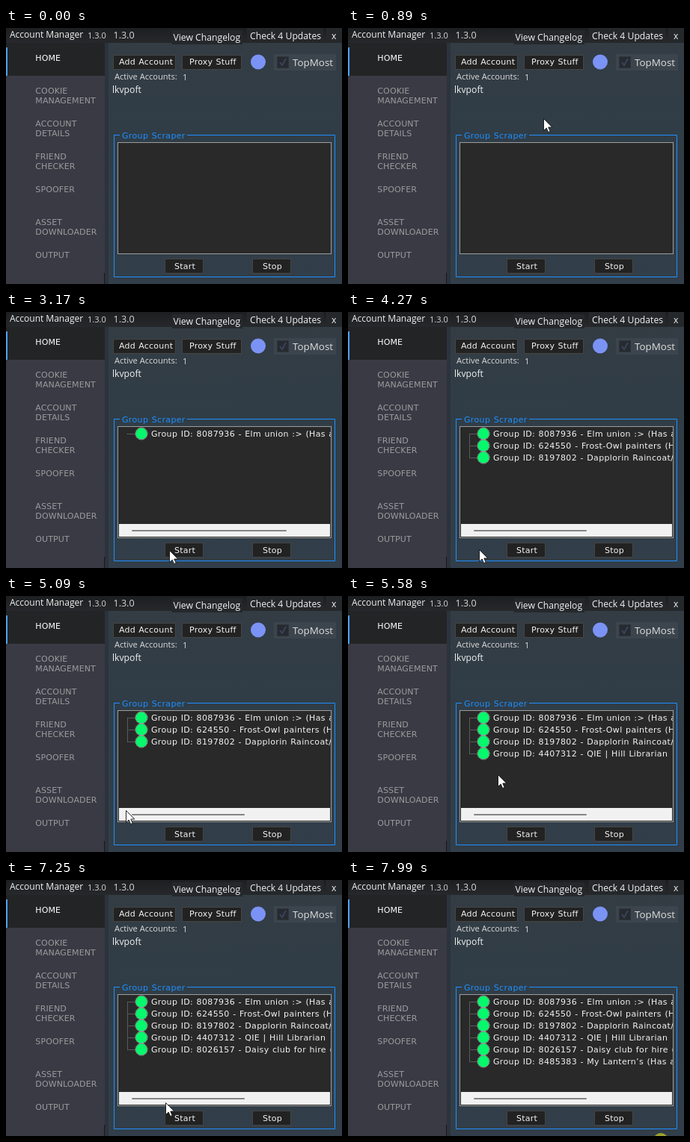
An HTML page for the animation above (8060 ms loop, 449 by 343 pixels).

```html
<!DOCTYPE html>
<html lang="en">
<head>
<meta charset="utf-8">
<title>Account Manager</title>
<style>
  html, body { margin: 0; width: 100%; height: 100%; overflow: hidden; background: #303c46; }
  svg { display: block; width: 449px; height: 343px; }
  text { white-space: pre; }
  .ui { font: 12.2px "Open Sans", "Noto Sans", sans-serif; fill: #f2f2f2; }
  .wide { font: 11px "DejaVu Sans", sans-serif; letter-spacing: .35px; word-spacing: .6px; fill: #f4f4f4; }
  .label { letter-spacing: .22px; }
  .menu { font: 11px "DejaVu Sans", sans-serif; letter-spacing: .12px; fill: #9b9b9e; }
  .btn { fill: #222; stroke: #454545; }
  .dots { stroke: #8c8c8c; stroke-dasharray: 1 1; fill: none; }
  .ring { stroke: #fff; stroke-dasharray: 1 1; fill: none; }
</style>
</head>
<body>
<svg id="stage" viewBox="0 0 449 343">
  <defs>
    <linearGradient id="panel" x2="0" y2="1">
      <stop offset="0" stop-color="#343c43"/>
      <stop offset=".4" stop-color="#303d47"/>
      <stop offset="1" stop-color="#323e49"/>
    </linearGradient>
    <linearGradient id="bar" x2="0" y2="1">
      <stop offset="0" stop-color="#1d1e20"/>
      <stop offset="1" stop-color="#26282b"/>
    </linearGradient>
    <clipPath id="listClip"><rect x="150" y="154" width="284" height="148"/></clipPath>
  </defs>

  <rect width="449" height="343" fill="url(#panel)"/>
  <rect x="132" y="20" width="5" height="323" fill="#2b333d"/>
  <rect y="20" width="132" height="323" fill="#393a43"/>
  <rect x="131" y="328" width="1" height="15" fill="#17181b"/>
  <rect width="449" height="20" fill="url(#bar)"/>
  <rect y="20" width="132" height="44" fill="#232425"/>
  <rect y="26" width="2" height="38" fill="#4f9ff0"/>
  <g id="menu"></g>

  <g class="ui">
    <text x="5" y="13" style="font-size:12px">Account Manager</text>
    <text x="109" y="14" style="font-size:11px" fill="#d8d8d8">1.3.0</text>
    <text x="143.5" y="14" style="font-size:12.5px" fill="#d8d8d8">1.3.0</text>
    <rect x="222" y="3" width="94" height="19" fill="#25282b"/>
    <rect x="322" y="0" width="102" height="20" fill="#25282b"/>
    <rect x="428" y="0" width="21" height="20" fill="#25282b"/>
    <text x="223.5" y="16.5">View Changelog</text>
    <text x="326" y="15">Check 4 Updates</text>
    <text x="435" y="15">x</text>
    <text x="145" y="69" style="font-size:11.1px" fill="#dcdcdc">Active Accounts:</text>
    <text x="236" y="70" style="font-size:11.1px" fill="#dcdcdc">1</text>
    <text x="142" y="87">lkvpoft</text>
    <rect x="358" y="35" width="83" height="22" fill="#3c454d"/>
    <rect x="362.5" y="38.5" width="15" height="15" fill="#272b30" stroke="#2e343a"/>
    <path d="M366 46l3 4 5-9" fill="none" stroke="#3a4666" stroke-width="1.6"/>
    <text x="383" y="51" style="font-size:13.4px" fill="#dedede">TopMost</text>
  </g>
  <circle cx="337" cy="45.5" r="10" fill="#7b93f5"/>

  <g id="buttons"></g>

  <path d="M152 143.5H144.5V333.5H439.5V143.5H242" fill="none" stroke="#1e90ff"/>
  <text class="wide" x="155" y="148" style="fill:#1e90ff">Group Scraper</text>
  <rect x="149.5" y="153.5" width="285" height="149" fill="#292929" stroke="#9c9c9c"/>

  <g clip-path="url(#listClip)">
    <g id="rows"></g>
    <g id="scroll">
      <rect x="151" y="284" width="282" height="17" fill="#f1f1f1"/>
      <rect id="thumb" x="168" y="292" height="2" rx="1" fill="#858585"/>
    </g>
  </g>

  <circle id="click" cx="418" cy="349" r="10" fill="#d8d81c" fill-opacity=".65"/>
  <path id="cursor" d="M-.5 -.5V15.5L3.2 12 5.6 17.6 8.2 16.4 5.8 11H10.8Z" fill="#fff" stroke="#111" stroke-width=".9"/>
</svg>

<script>
const LOOP = 8060, STEP = 70, FIRST = 190;
const $ = id => document.getElementById(id);

function add(parent, tag, attrs, text) {
  const el = document.createElementNS("http://www.w3.org/2000/svg", tag);
  for (const key in attrs) el.setAttribute(key, attrs[key]);
  if (text) el.textContent = text;
  parent.appendChild(el);
  return el;
}

const menu = [
  [44, "HOME"], [88, "COOKIE", "MANAGEMENT"], [132, "ACCOUNT", "DETAILS"],
  [176, "FRIEND", "CHECKER"], [220, "SPOOFER"], [264, "ASSET", "DOWNLOADER"], [308, "OUTPUT"]
];
for (const [y, ...lines] of menu)
  lines.forEach((line, i) => add($("menu"), "text", {
    class: "menu", x: 39.3, y: y + i * 13, style: y === 44 ? "fill:#fff" : ""
  }, line));

// x, y, width, text offset, label
const buttons = [
  [143, 36, 84, 8, "Add Account"], [235, 36, 80, 10, "Proxy Stuff"],
  [212, 309, 52, 13, "Start"], [329, 309, 52, 14, "Stop"]
];
for (const [x, y, w, dx, label] of buttons) {
  add($("buttons"), "rect", { class: "btn", x: x + .5, y: y + .5, width: w - 1, height: 19 });
  add($("buttons"), "text", { class: "wide label", x: x + dx, y: y + (y > 100 ? 14 : 13) }, label);
}

// time each group turns up, its text
const groups = [
  [2280, "8087936 - Elm union :> (Has a"],
  [3310, "624550 - Frost-Owl painters (Has"],
  [4270, "8197802 - Dapplorin Raincoat/"],
  [5300, "4407312 - QIE | Hill Librarian"],
  [6280, "8026157 - Daisy club for hire (Ha"],
  [7300, "8485383 - My Lantern’s (Has a"]
];
const rows = groups.map(([, text], i) => {
  const y = 163 + i * 16, g = add($("rows"), "g", {});
  add(g, "path", { class: "dots", d: `M162 ${y + .5}H174` + (i ? `M162.5 ${y - 16}V${y}` : "") });
  add(g, "circle", { cx: 181, cy: y, r: 7.6, fill: "#06f86c" });
  add(g, "circle", { class: "ring", cx: 181, cy: y, r: 8 });
  add(g, "text", { class: "wide", x: 194, y: y + 4 }, "Group ID: " + text);
  return g;
});

// pointer path: time, x, y
const path = [
  [190, 424, 307], [400, 385, 235], [680, 305, 150], [960, 248, 112], [1030, 248, 124],
  [1380, 243, 215], [1730, 233, 303], [1800, 218, 314], [1940, 219, 320], [3170, 219, 320],
  [3520, 197, 322], [3940, 176, 319], [4270, 176, 319], [4650, 168, 308], [5020, 163, 296],
  [5230, 156, 272], [5580, 201, 240], [5860, 238, 238], [6200, 268, 258], [6490, 278, 274],
  [6760, 277, 272], [7050, 158, 285], [7330, 270, 312], [7610, 396, 328], [7660, 400, 332],
  [7730, 404, 345]
];

function pointAt(t) {
  const i = Math.max(1, path.findIndex(p => p[0] >= t));
  const [t0, x0, y0] = path[i - 1], [t1, x1, y1] = path[i];
  const k = (t - t0) / (t1 - t0);
  return [x0 + (x1 - x0) * k, y0 + (y1 - y0) * k];
}

const show = (el, on) => el.setAttribute("visibility", on ? "visible" : "hidden");

function draw(t) {
  rows.forEach((row, i) => show(row, t >= groups[i][0]));
  show($("scroll"), t >= groups[0][0]);
  $("thumb").setAttribute("width", t >= groups[1][0] ? 151 : 207);
  show($("click"), t >= 7990);

  const moving = t >= FIRST && t < 7730;
  show($("cursor"), moving);
  if (moving) {
    const tick = FIRST + Math.floor((t - FIRST) / STEP) * STEP;
    const [x, y] = pointAt(tick);
    $("cursor").setAttribute("transform", `translate(${Math.round(x)} ${Math.round(y)})`);
  }
}

const start = performance.now();
function frame() {
  draw((performance.now() - start) % LOOP);
  requestAnimationFrame(frame);
}
frame();
</script>
</body>
</html>
```
